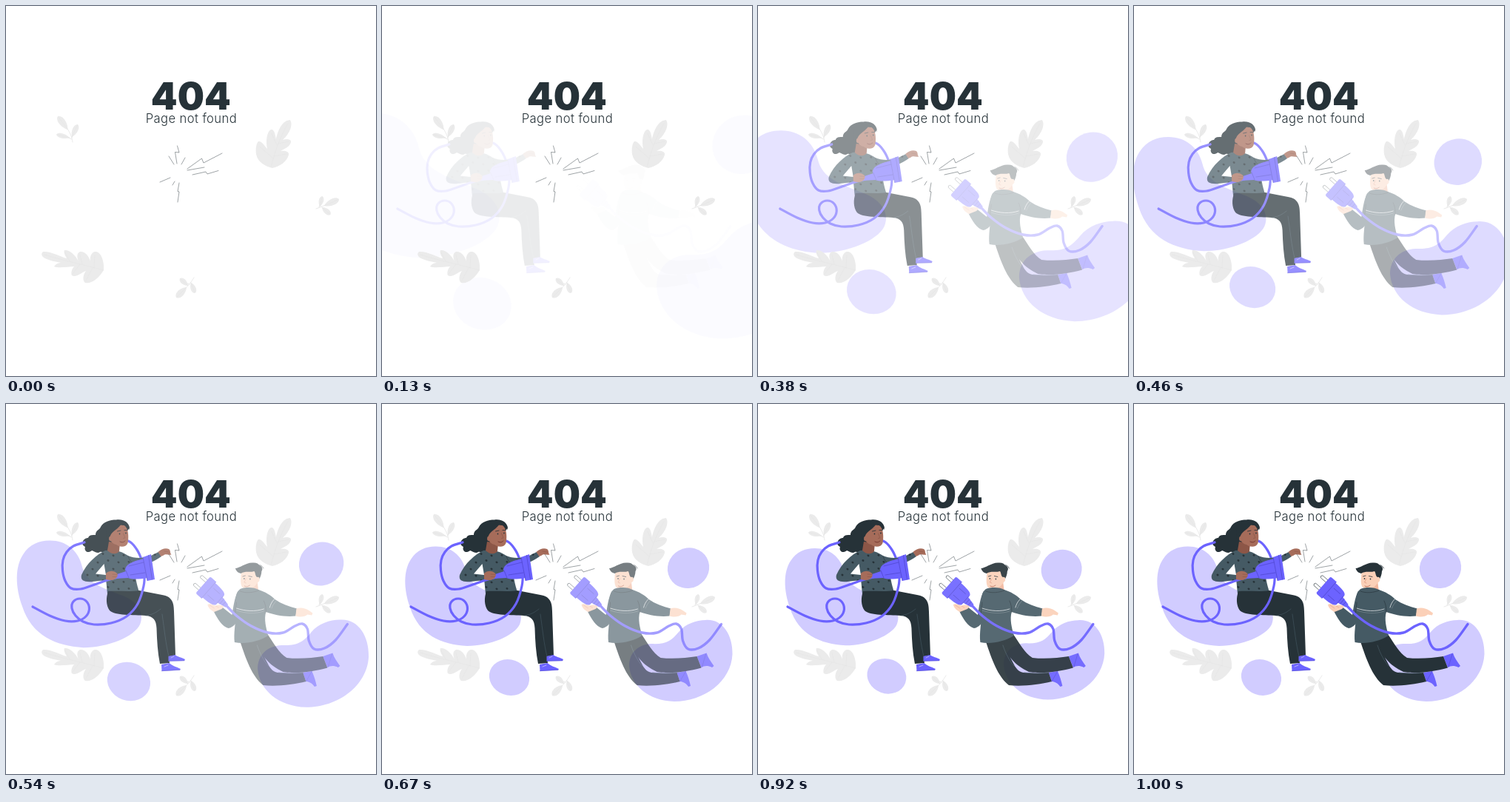
An HTML page with a canvas that plays this animation: 500x500 px, repeating every 1040 ms.

```html
<!DOCTYPE html>
<html lang="en">
<head>
<meta charset="utf-8">
<title>404</title>
<style>
html, body { margin: 0; width: 100%; height: 100%; overflow: hidden; background: #fff; }
canvas { display: block; width: 500px; height: 500px; }
</style>
</head>
<body>
<canvas id="stage"></canvas>
<script>
const LOOP = 1040, SIZE = 500;
const DARK = '#263238', WOOL = '#455a64', PURPLE = '#6c63ff', DEEP = '#5148d0';
const LEAF = '#ebebeb', VEIN = '#e0e0e0', TAN = '#a66c5a', TAN_DARK = '#8c5647', PEACH = '#fbd0b8';
const dpr = window.devicePixelRatio || 1;

const stage = document.getElementById('stage');
const layer = document.createElement('canvas');
for (const c of [stage, layer]) c.width = c.height = SIZE * dpr;
const main = stage.getContext('2d');
const group = layer.getContext('2d');

function fill(ctx, d, color) {
  ctx.fillStyle = color;
  ctx.fill(new Path2D(d));
}

function line(ctx, d, color, width) {
  ctx.strokeStyle = color;
  ctx.lineWidth = width;
  ctx.lineCap = ctx.lineJoin = 'round';
  ctx.stroke(new Path2D(d));
}

function dot(ctx, x, y, rx, ry = rx, turn = 0) {
  ctx.beginPath();
  ctx.ellipse(x, y, rx, ry, turn, 0, Math.PI * 2);
  ctx.fill();
}

// Smooth curve through all points, given as 'x,y x,y ...'
function cable(ctx, text, width) {
  const pts = text.split(' ').map(s => s.split(',').map(Number));
  const at = i => pts[Math.max(0, Math.min(pts.length - 1, i))];
  let d = 'M' + pts[0];
  for (let i = 0; i < pts.length - 1; i++) {
    const a = at(i - 1), b = at(i), c = at(i + 1), e = at(i + 2);
    d += `C${b[0] + (c[0] - a[0]) / 6} ${b[1] + (c[1] - a[1]) / 6} ` +
      `${c[0] - (e[0] - b[0]) / 6} ${c[1] - (e[1] - b[1]) / 6} ${c[0]} ${c[1]}`;
  }
  line(ctx, d, PURPLE, width);
}

// Pointed oval from (x, y) to (u, v), w is its half width
function leaf(ctx, x, y, u, v, w) {
  const len = Math.hypot(u - x, v - y);
  const nx = -(v - y) / len * w * 1.35, ny = (u - x) / len * w * 1.35;
  const ax = x + (u - x) * .35, ay = y + (v - y) * .35;
  const bx = x + (u - x) * .9, by = y + (v - y) * .9;
  fill(ctx, `M${x} ${y}C${ax + nx} ${ay + ny} ${bx + nx} ${by + ny} ${u} ${v}` +
    `C${bx - nx} ${by - ny} ${ax - nx} ${ay - ny} ${x} ${y}Z`, LEAF);
  line(ctx, `M${x} ${y}L${bx} ${by}`, VEIN, .4);
}

function drawBlobs(ctx, p) {
  const s = 1.5 - .5 * p;
  ctx.save();
  ctx.globalAlpha = Math.min(1, p);
  ctx.translate(252.5, 297.5);
  ctx.scale(s, s);
  ctx.translate(-252.5, -297.5);
  fill(ctx, 'M72 192.500C92 192 108 204 113 224C118 246 140 252 165 262C184 270 192 284 186 298C179 313 146 327 115 327C80 325 50 312 38 275C29 250 29 225 39 210C47 197 60 192.500 72 192.500Z', '#d1ccff');
  fill(ctx, 'M437 292C460 290 474 312 473.500 338C472 375 435 402 395 402C360 401 336 380 334 354C334 336 346 325 364 324C384 325 391 320 401 308C410 297 425 292 437 292Z', '#d1ccff');
  dot(ctx, 414, 221.700, 28.500, 27, -.5);
  dot(ctx, 172, 369.500, 27.500, 24, .35);
  ctx.restore();
}

function drawLeaves(ctx) {
  line(ctx, 'M90 184C89 176 86 170 81 163M89 180L84 178M89 178L92 172', LEAF, 1);
  leaf(ctx, 83.500, 167, 70, 149, 4.500);
  leaf(ctx, 89, 177, 97, 160, 3.800);
  leaf(ctx, 86, 178, 68, 173.500, 3.200);

  line(ctx, 'M254 367C250 374 246 378 241 383M248 376L242 374M250 374L251 378', LEAF, 1);
  leaf(ctx, 246, 378, 235, 368, 3.500);
  leaf(ctx, 244, 380, 230, 394, 4.500);
  leaf(ctx, 250, 374, 255.500, 388, 3.600);

  line(ctx, 'M419 274C425 272 429 270 434 268M423 272L424 268M426 271L430 275', LEAF, 1);
  leaf(ctx, 424, 271, 427.500, 257, 3.200);
  leaf(ctx, 430, 270, 450, 261, 4.300);
  leaf(ctx, 427, 272, 438.500, 282, 3.600);

  fill(ctx, 'M360 219C352 217 340 212 338 200C337 194 338 186 341 183C346 182 350 190 353 193C351 184 352 170 358 167C363 166 364 175 365 180C367 168 374 154 384 154C388 160 384 172 374 181C379 179 386 180 385 184C384 190 376 193 371 196C376 195 383 196 382 201C380 210 370 217 360 219Z', LEAF);
  line(ctx, 'M358 218C363 198 370 177 381 159M361 206L343 190M362 203L379 200M366 188L359 172M368 186L382 183', VEIN, .4);

  fill(ctx, 'M132 357C133 348 130 334 122 332C115 331 113 340 114 345C112 337 106 331 100 332C95 334 96 340 98 345C94 337 86 329 79 330C77 334 82 340 82 341C72 338 60 331 50 332C46 335 49 340 55 342C63 345 70 346 74 347C70 347 66 350 65 352C72 355 84 352 92 352C90 354 87 360 89 364C94 368 102 360 108 358C104 363 103 371 107 374C116 376 126 367 132 357Z', LEAF);
  line(ctx, 'M131 357C108 350 80 345 52 336M119 354L120 337M117 354L108 371M103 349L100 336M100 349L90 362M86 345L80 333', VEIN, .4);
}

function drawBolts(ctx) {
  line(ctx, 'M231.500 189L234 198L228.500 197.500L231 213M220 203L227 214M242 205L237 214' +
    'M245 220L264.500 206L267 212L292 199M245 222L268 218' +
    'M252 228L270 224L272 227L287 222.500M208 238L222 232M228 237L225 242' +
    'M234 239L232 250.500L234 251L232 265', DARK, .45);
}

function drawTitle(ctx) {
  ctx.fillStyle = DARK;
  ctx.textAlign = 'center';
  ctx.textBaseline = 'alphabetic';
  ctx.font = '900 51px Inter, "Open Sans", sans-serif';
  ctx.letterSpacing = '0px';
  ctx.fillText('404', 249.8, 139.5);
  ctx.font = '300 16.6px Inter, "Open Sans", sans-serif';
  ctx.letterSpacing = '0.4px';
  ctx.fillText('Page not found', 250.4, 158);
}

function drawWoman(ctx) {
  // cable behind the head
  cable(ctx, '108,187 140,181 168,185 180,197 187,212', 3.2);
  fill(ctx, 'M152 156.500C163 155 169 161 170 167L160 182L147 188L143 199C139 203 133 199 130 200C126 203 121 198 119 198C113 203 108 198 110 193C103 190 107 181 114 181C115 176 122 177 124 177C124 170 130 170 131 166C135 159 143 156.500 152 156.500Z', DARK);

  // sleeves and body, with the gap inside the bent arm
  const top = 'M137 198C148 196 160 199 168 205C176 209 190 209 199 205L209 200L213 206C202 214 190 218 178 217C176 230 180 245 183 254L140 256C139 248 139 243 138 238L120 240C110 241 103 239 105 231C112 215 126 203 137 198Z';
  const gap = 'M124 229.500L135.500 216L138 231Z';
  const wool = new Path2D(top + gap);
  ctx.save();
  ctx.clip(wool, 'evenodd');
  ctx.fillStyle = WOOL;
  ctx.fillRect(100, 190, 120, 70);
  ctx.fillStyle = DARK;
  for (let row = 0; row < 7; row++)
    for (let col = 0; col < 9; col++)
      dot(ctx, 106 + col * 14 + row % 2 * 7, 204 + row * 9 + Math.sin(col * 2.3) * 1.5, 1.6, 1.3, .5);
  ctx.restore();
  line(ctx, 'M168 206C170 212 174 216 178 217', DARK, .6);

  // neck and face
  fill(ctx, 'M142 186L157 188L156 199C152 204 145 203 140 198Z', TAN_DARK);
  fill(ctx, 'M143 177C144 167 153 161 163 164C169 168 169 181 167.500 188C165 194 157 194 152 190C146 189 143 184 143 177Z', TAN);
  fill(ctx, 'M143 181C145 172 152 171 158 163.500C164 163 168 167 170 170C169 161 161 156 152 157C141 158 136 170 139 182Z', DARK);
  ctx.fillStyle = TAN;
  dot(ctx, 144.500, 182, 2.4, 3.2);
  ctx.fillStyle = DARK;
  dot(ctx, 156.500, 175.500, .8, 1);
  dot(ctx, 165, 174.500, .8, 1);
  line(ctx, 'M153.500 172L158 171M163 170.500L166.500 170.500', DARK, .8);
  line(ctx, 'M161.500 175L164 181L161.500 181.500', TAN_DARK, .7);
  line(ctx, 'M157 186C160 187.500 162 187 164 185', '#74372f', 1);

  // legs
  fill(ctx, 'M141 253C138 262 138 272 143 279C150 286 175 285 192 286C202 287 206 292 206.500 303C207 320 208 336 211 351L224 350L223 341L232 340L230 280C230 268 227 260 214 258L183 252C170 254 155 252 141 253Z', DARK);
  line(ctx, 'M192 286C201 285 207 281 212 277M214 284C217 305 219 325 223 341', WOOL, .6);
  fill(ctx, 'M222.500 341L231.500 339C235 342 241 342.500 245 345L244 347L222.500 347.500Z', PURPLE);
  fill(ctx, 'M213 352L223.500 350C228 354 233 355 239 358L238 359.500L213.500 361Z', PURPLE);
  line(ctx, 'M222.500 347.300L244 346.800M213.500 360.700L238 359.300', DEEP, .6);
  line(ctx, 'M226 343L230 341M217 355L222 353', '#fff', .5);

  // cable in front
  cable(ctx, '158,233 140,238 120,245 104,250 91,249 83,239 79.500,225 80,211 85,200 94,192 109,187', 3.2);
  cable(ctx, '187,212 190,228 189,246 181,270 166,287 145,296 122,298 107,294 97,286 92,276 94,267 103,263 112,267 115.500,277 111,287 100,293 83,293 62,286 39,274', 3.2);

  // plug
  fill(ctx, 'M150 236L153 230L165 226L169 235Z', PURPLE);
  fill(ctx, 'M164 224C165 217 172 213 189 209L194 235C182 237 173 237 168 235Z', PURPLE);
  fill(ctx, 'M188 207L199 203L204 237L194 239Z', PURPLE);
  line(ctx, 'M188 207L194 238.500M195.500 204.500L200.500 237M165 225L169 235M169 219L189 214M171 231L191 228', DEEP, .8);

  // hands
  fill(ctx, 'M138 229C142 225 148 225 152 228C155 230 154 234 151 236C147 239 142 238 138 237Z', TAN);
  line(ctx, 'M147 230L153 230.500M147 233.500L152 233.500', TAN_DARK, .6);
  fill(ctx, 'M208.500 200C213 195.500 219 194 223 196C226 198 224 201 226.500 203.500C222 204.500 219 202 216 204.500L212.500 206Z', TAN);
  line(ctx, 'M217 199L223 200', TAN_DARK, .6);
}

function drawManPlug(ctx) {
  ctx.save();
  ctx.translate(270, 257);
  ctx.rotate(-2.42);
  for (const y of [-7, 7]) {
    const prong = `M16 ${y - 2}L28 ${y - 2}Q30.500 ${y} 28 ${y + 2}L16 ${y + 2}Z`;
    fill(ctx, prong, '#fff');
    line(ctx, prong, DARK, .6);
  }
  fill(ctx, 'M-24 -2.500L-10 -5.500L-10 5.500L-24 2.500Z', PURPLE);
  fill(ctx, 'M-12 -8C-11 -12 -4 -13 10 -13L10 13C-4 13 -11 12 -12 8Z', PURPLE);
  fill(ctx, 'M8 -15L17 -15Q19 -14.500 19 -13L19 13Q19 14.500 17 15L8 15Z', PURPLE);
  line(ctx, 'M8.500 -14L8.500 14M-11.500 -6L-11.500 6M-15 -4L-15 4M-19 -3L-19 3M-6 -6L5 -6M-6 6L5 6', DEEP, .8);
  ctx.restore();
}

function drawMan(ctx) {
  // legs
  fill(ctx, 'M391 363L403 361C406 368 408 374 409.500 381L406.500 382C403 377 399 375 395 375Z', PURPLE);
  fill(ctx, 'M418 341L431 336.500C433 343 437 348 441 354L438.500 356C432 353 428 354 424 356Z', PURPLE);
  line(ctx, 'M403 361L395 375M430 338L425 355', DEEP, .6);
  fill(ctx, 'M318 318L343 311C352 324 358 336 369 343C386 345 404 343 418 341L424 356.500C404 362 382 365 364 362C354 357 347 352 341 345Z', DARK);
  fill(ctx, 'M306 321L330 317C333 330 338 341 344 352C347 358 351 362 357 363C370 364 382 364 391 363L395 375C378 379 356 382 337 380C322 368 314 345 306 321Z', DARK);
  line(ctx, 'M329 326C333 338 338 347 344 354M358 363C372 364.500 382 364 391 363', WOOL, .7);

  // neck and head
  fill(ctx, 'M315 244L329 238L331 254L313 254Z', '#f2b79d');
  fill(ctx, 'M308 225C306.500 235 306 243 308.500 247C312 251.500 320 251 325 247L331 240L332 226Z', PEACH);
  fill(ctx, 'M307 229C303 228 301 226 299.500 222C305 222 314 214 323 214.500C328 214 331 216 332 218C336 219 337 223 335 226C335 230 333 235 331 238L329 234C326 232 327 228 325 226C319 228 313 225 307 229Z', DARK);
  line(ctx, 'M331 218C334 217 336 219 337.500 222', DARK, .8);
  ctx.fillStyle = PEACH;
  dot(ctx, 330, 237, 2.3, 3.2);
  ctx.fillStyle = DARK;
  dot(ctx, 311.500, 236, .8, 1);
  dot(ctx, 319.500, 236.500, .8, 1);
  line(ctx, 'M309.500 233L313 232M317.500 232.500L322 233.500', DARK, .8);
  line(ctx, 'M314 236L311.500 241L314 242', '#e0957a', .7);
  line(ctx, 'M312 246C315 247.500 317 246.500 319 245', '#a8543f', .8);

  // sweater
  fill(ctx, 'M303 253C298 262 297 275 295 285L280 273L270 279.500C275 290 282 301 290 303C297 302 301 296 305 288Z', WOOL);
  fill(ctx, 'M306 250C314 247 325 247.500 331 251C340 254 347 258 353 264C362 270 372 274 383 276.500L381 286.500C366 288 352 285 341 281C338 290 341 303 344 313C331 321 313 325 298.500 322C297 310 300 296 300 285C299 272 299 260 303 253Z', WOOL);
  line(ctx, 'M301 276C313 280 326 281 338 277M346 275C347 271 349 267 352 264', '#dfe3e5', .8);
  line(ctx, 'M301 279C313 283 326 284 338 280M348.500 276C350 272 352 269 355 266', '#8a989e', .5);
  line(ctx, 'M306 253C314 256 323 255 331 252M341 281C341 275 340 270 338 266M299 285C300 278 301 272 301 268', DARK, .6);
  fill(ctx, 'M382 276.500C388 274.500 394 276 399 279L404 282.500L403 285.500L397 284.500C394 288 386 288 381 286.500Z', PEACH);

  // cable, plug and the hand on it
  cable(ctx, '286,271 301,286 321,300 344,309 364,309 380,300 390,297 397,304 399,320 406,331 420,330 435,319 451,297.500', 3.4);
  drawManPlug(ctx);
  fill(ctx, 'M262 271C265 269 269 271 273 273C275 271 281 271 284 274L281 277L271 281C267 279 263 276 262 271Z', PEACH);
  line(ctx, 'M265 272L271 276M273 273L277 275', '#e0957a', .5);
}

// Draws a figure as one flat layer, so that its parts fade together
function fade(draw, x, alpha) {
  group.setTransform(dpr, 0, 0, dpr, 0, 0);
  group.clearRect(0, 0, SIZE, SIZE);
  group.translate(x, 0);
  draw(group);
  main.globalAlpha = Math.max(0, Math.min(1, alpha));
  main.drawImage(layer, 0, 0, SIZE, SIZE);
  main.globalAlpha = 1;
}

// cubic-bezier(.36, -.01, .5, 1.38)
function overshoot(t) {
  const curve = (u, a, b) => 3 * (1 - u) * (1 - u) * u * a + 3 * (1 - u) * u * u * b + u * u * u;
  let lo = 0, hi = 1;
  for (let i = 0; i < 30; i++) {
    const mid = (lo + hi) / 2;
    if (curve(mid, .36, .5) < t) lo = mid; else hi = mid;
  }
  return curve(hi, -.01, 1.38);
}

// 24 steps a second, each starting on a full 10 ms
function stepAt(ms) {
  let k = 0;
  while (k < 24 && 10 * Math.round((k + 1) * 25 / 6) <= ms) k++;
  return k;
}

function render(ms) {
  const k = stepAt(ms);
  main.setTransform(dpr, 0, 0, dpr, 0, 0);
  main.fillStyle = '#fff';
  main.fillRect(0, 0, SIZE, SIZE);
  const shown = k >= 3;
  const p = overshoot((k + 1) / 25);
  const q = (k - 2.8) / 21.2;
  if (shown) drawBlobs(main, p);
  drawLeaves(main);
  drawTitle(main);
  if (shown) {
    fade(drawWoman, -20 * (1 - p), p);
    fade(drawMan, 20 * (1 - q), q);
  }
  drawBolts(main);
}

const start = performance.now();
function tick() {
  render((performance.now() - start) % LOOP);
  requestAnimationFrame(tick);
}
tick();
</script>
</body>
</html>
```
